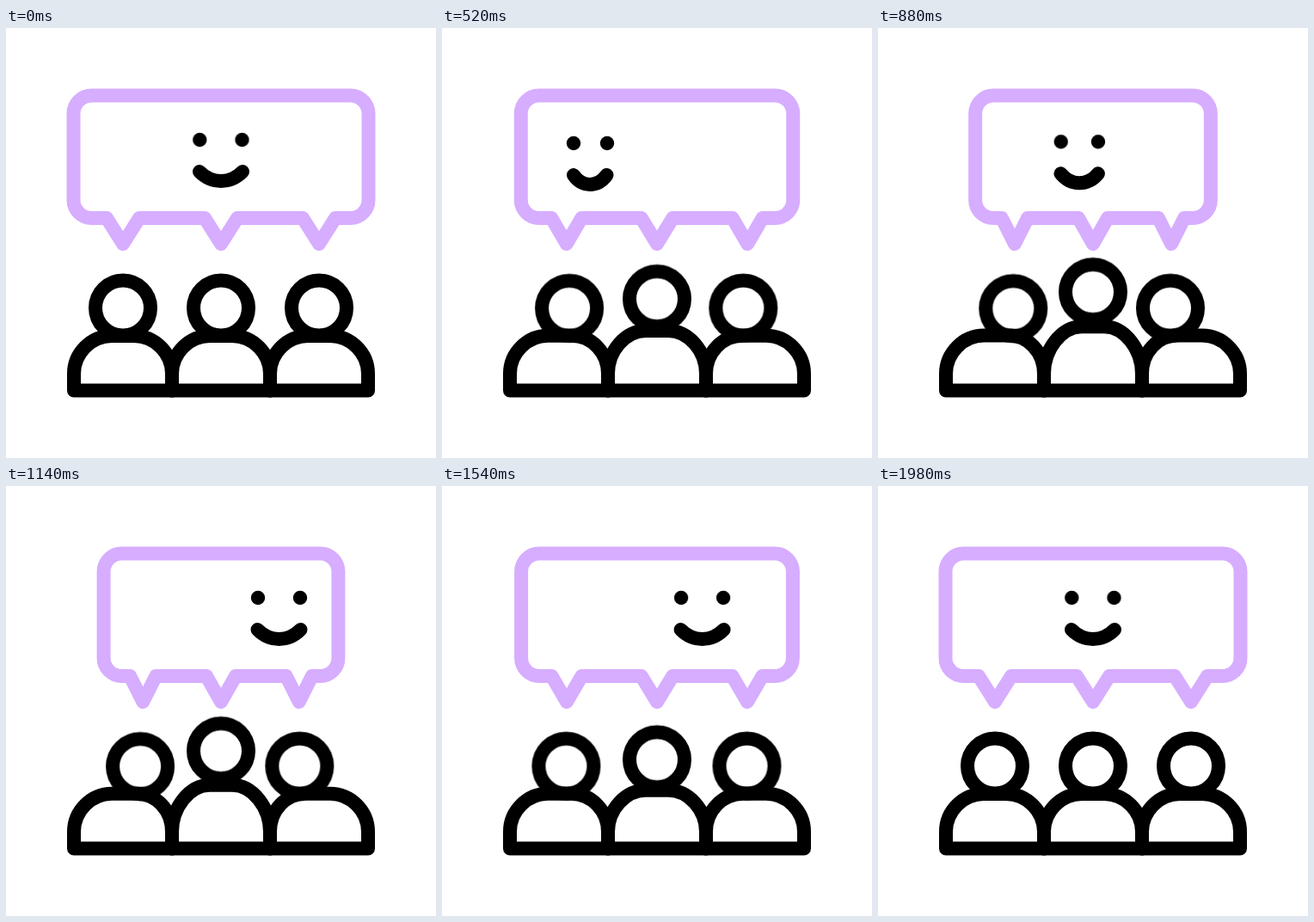
Write an HTML page without scripts that moves like this. It is 500 px wide and 500 px high and loops after 2000 ms.

```html
<!DOCTYPE html>
<html lang="en">
<head>
<meta charset="utf-8">
<title>Team chat</title>
<style>
  html, body { margin: 0; width: 100%; height: 100%; overflow: hidden; background: #fff; }
  svg { display: block; width: 100%; height: 100%; }

  .line { fill: none; stroke: #000; stroke-width: 16; stroke-linecap: round; stroke-linejoin: round; }
  .bubble { stroke: #d7adff; }

  .bubble, .head, .torso, .side, .face * {
    --soft: cubic-bezier(.333, 0, .667, 1);
    --firm: cubic-bezier(.63, 0, .37, 1);
    animation: 2s infinite;
  }

  /* People lean together */
  .head, .torso, .side { animation-timing-function: var(--soft); }
  .head { animation-name: lean; }
  .torso { animation-name: stretch; }
  .side { animation-name: shrug; }
  .left { --lean: 21.8px, .6px; }
  .mid { --lean: 0px, -19px; }
  .right { --lean: -24.6px, .2px; }
  @keyframes lean {
    0%, 98%, 100% { transform: translate(0px, 0px); }
    48.5% { transform: translate(var(--lean)); }
  }
  @keyframes stretch {
    0%, 98%, 100% { d: path("M193 421.5V402C193 378 213 358 237 358H263C287 358 307 378 307 402V421.5"); }
    48.5% { d: path("M193 421.5V402C193 374 213 347 237 347H263C287 347 307 374 307 402V421.5"); }
  }
  @keyframes shrug {
    0%, 98%, 100% { d: path("M193 421.5H79V402C79 378 99 358 123 358H149C173 358 193 378 193 402Z"); }
    48.5% { d: path("M193 421.5H79V402C79 378 99 357.6 123 357.6H152C175 357.6 193 377 193 402Z"); }
  }

  /* Bubble narrows and widens */
  .bubble { animation-name: squeeze; animation-timing-function: var(--firm); }
  @keyframes squeeze {
    0%, 5.5%, 98%, 100% {
      d: path("M99.5 78.5H400.5A21 21 0 0 1 421.5 99.5V200A21 21 0 0 1 400.5 221H383L364 251L345 221H269L250 251L231 221H155L136 251L117 221H99.5A21 21 0 0 1 78.5 200V99.5A21 21 0 0 1 99.5 78.5Z");
    }
    51%, 52% {
      d: path("M135 78.5H365A21 21 0 0 1 386 99.5V200A21 21 0 0 1 365 221H355.5L340.5 251L325.5 221H267L250 251L233 221H174.5L159.5 251L144.5 221H135A21 21 0 0 1 114 200V99.5A21 21 0 0 1 135 78.5Z");
    }
  }

  /* Face looks left, then right, then ahead */
  .face * { animation-timing-function: var(--firm); }
  .eye-l { animation-name: eye-l; }
  .eye-r { animation-name: eye-r; }
  .mouth { animation-name: mouth; }
  @keyframes eye-l {
    0%, 89.5%, 100% { transform: translate(225.3px, 130px); }
    19%, 34.6% { transform: translate(153px, 134px); }
    54.6%, 69.5% { transform: translate(293px, 130px); }
  }
  @keyframes eye-r {
    0%, 89.5%, 100% { transform: translate(274.5px, 130px); }
    19%, 34.6% { transform: translate(192px, 134px); }
    54.6%, 69.5% { transform: translate(342px, 130px); }
  }
  @keyframes mouth {
    0%, 89.5%, 100% { d: path("M225 167C239 181.5 261 181.5 275 167"); }
    19%, 34.6% { d: path("M153 171C163 185.5 181 185.5 191.5 171"); }
    54.6%, 69.5% { d: path("M292.5 167C306.5 181.5 328.5 181.5 342.5 167"); }
  }
</style>
</head>
<body>
<svg viewBox="0 0 500 500">
  <path class="line bubble" d="M99.5 78.5H400.5A21 21 0 0 1 421.5 99.5V200A21 21 0 0 1 400.5 221H383L364 251L345 221H269L250 251L231 221H155L136 251L117 221H99.5A21 21 0 0 1 78.5 200V99.5A21 21 0 0 1 99.5 78.5Z"/>

  <g class="face">
    <circle class="eye-l" r="8.2"/>
    <circle class="eye-r" r="8.2"/>
    <path class="line mouth" d="M225 167C239 181.5 261 181.5 275 167"/>
  </g>

  <g class="line">
    <path class="side" d="M193 421.5H79V402C79 378 99 358 123 358H149C173 358 193 378 193 402Z"/>
    <path class="side" transform="matrix(-1 0 0 1 500 0)" d="M193 421.5H79V402C79 378 99 358 123 358H149C173 358 193 378 193 402Z"/>
    <path d="M193 421.5H307"/>
    <path class="torso" d="M193 421.5V402C193 378 213 358 237 358H263C287 358 307 378 307 402V421.5"/>
    <circle class="head left" cx="136" cy="325.5" r="32"/>
    <circle class="head mid" cx="250" cy="325.5" r="32"/>
    <circle class="head right" cx="364" cy="325.5" r="32"/>
  </g>
</svg>
</body>
</html>
```
